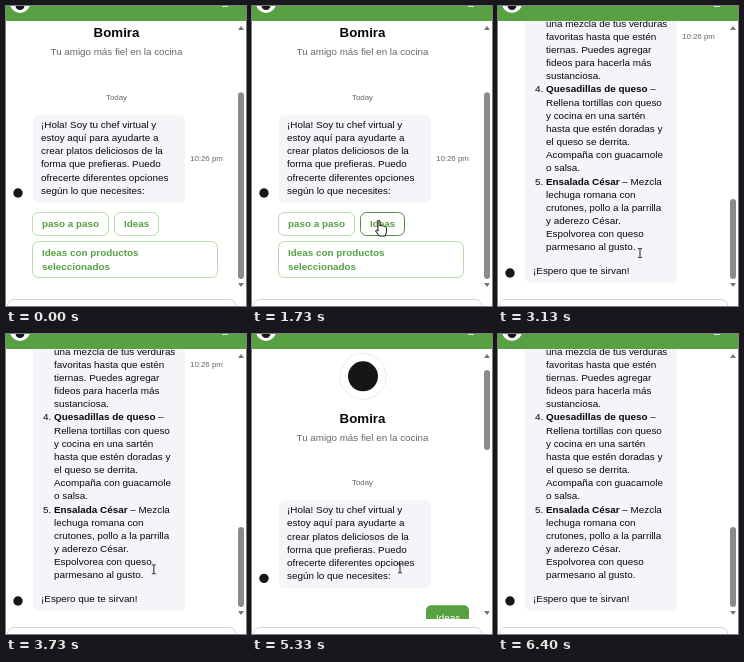
Recreate the animation shown at these times as an HTML page. Size 240 by 300 pixels, loop 6470 ms.

```html
<!DOCTYPE html>
<html lang="es">
<head>
<meta charset="utf-8">
<style>
  html, body { margin: 0; width: 100%; height: 100%; overflow: hidden; background: #fff; }
  svg { display: block; width: 100%; height: 100%; }
  text { font: 9.9px "Liberation Sans", Arial, sans-serif; fill: #080808; white-space: pre; }
  .bold { font-weight: bold; }
  .title { font-size: 13.3px; font-weight: bold; }
  .mid { text-anchor: middle; }
  .soft { fill: #666; font-size: 9.8px; }
  .small { fill: #666; font-size: 7.9px; }
  .link { fill: #55a043; font-weight: bold; }
  .button { fill: #fff; stroke: #b9d8ae; }
  .hover { stroke: #4f8f3f; }
  .bubble { fill: #f4f4f9; }
  .green { fill: #57a143; }
  .mark { fill: #161616; }
</style>
</head>
<body>
<svg viewBox="0 0 240 300">
  <clipPath id="view"><rect y="14" width="231" height="271"/></clipPath>
  <g clip-path="url(#view)"><g id="page">
    <circle cx="111" cy="69" r="23" fill="#fff" stroke="#dcdcea" stroke-dasharray="1.5 1"/>
    <circle class="mark" cx="111" cy="69" r="15"/>
    <g id="intro"></g>
    <g id="choices"></g>
    <g id="request">
      <rect class="green" x="174" y="298" width="43" height="25" rx="5"/>
      <text x="184" y="313.2" style="fill:#fff">Ideas</text>
    </g>
    <g id="answer"></g>
  </g></g>

  <rect class="green" width="240" height="15"/>
  <circle cx="14" cy="-3" r="10" fill="#fff"/>
  <circle class="mark" cx="14" cy="-.5" r="4.5"/>
  <path d="M216 0h6" stroke="#fff" stroke-width="1.5"/>

  <path d="M232 24l3-4 3 4zM232 277l3 4 3-4z" fill="#777"/>
  <rect id="thumb" x="232" width="6" rx="3" fill="#8b8b8b"/>
  <rect x="1.5" y="293.5" width="228" height="40" rx="6" fill="#fff" stroke="#cfd9cb"/>

  <g id="cursor">
    <path id="arrow" d="M0 0v10.2l2.4-2.2 1.9 4.2 1.8-.8-1.9-4h3.3z" fill="#111" stroke="#fff" stroke-width=".6"/>
    <path id="beam" d="M-2-4.5h1.3l.7.6.7-.6H2M0-4v8M-2 4.5h1.3L0 3.9l.7.6H2" fill="none" stroke="#222"/>
    <path id="hand" d="M-1 0q1-1.2 2 0v5l1-.6 1.3.8 1-.4 1.2.9 1-.1 1 1v4l-1.2 4.4h-6l-3.8-5.2q.4-1.7 2.5.3z" fill="#fff" stroke="#111"/>
  </g>
</svg>
<script>
const LOOP = 6470, VIEW = 270, STEP = 13.16;
const CLICK = 2070, REPLY = 2600, LEAVE = 6270;
const $ = id => document.getElementById(id);

const text = (x, y, s, cls = '') => `<text class="${cls}" x="${x}" y="${y}">${s}</text>`;
const lines = (x, y, rows, cls) => rows.map((s, i) => text(x, y + i * STEP, s, cls)).join('');
const box = (cls, x, y, w, h) => `<rect class="${cls}" x="${x}" y="${y}" width="${w}" height="${h}" rx="6"/>`;
const avatar = y => `<circle class="mark" cx="12" cy="${y}" r="4.7"/>`;

$('intro').innerHTML =
  text(110.5, 115.2, 'Bomira', 'title mid') +
  text(110.5, 133.4, 'Tu amigo más fiel en la cocina', 'soft mid') +
  text(110.5, 177.7, 'Today', 'small mid') +
  box('bubble', 27, 193, 152, 88) + avatar(271) +
  lines(35, 206, [
    '¡Hola! Soy tu chef virtual y', 'estoy aquí para ayudarte a',
    'crear platos deliciosos de la', 'forma que prefieras. Puedo',
    'ofrecerte diferentes opciones', 'según lo que necesites:']);

$('choices').innerHTML =
  text(184, 238.7, '10:26 pm', 'small') +
  box('button', 26.5, 290.5, 76, 23) + text(36, 305.4, 'paso a paso', 'link') +
  box('button" id="pick', 108.5, 290.5, 44, 23) + text(118, 305.4, 'Ideas', 'link') +
  box('button', 26.5, 319.5, 185, 36) +
  lines(36, 334.4, ['Ideas con productos', 'seleccionados'], 'link');

const dishes = [
  ['Tacos de pollo', ' – Cocina', 'pechugas de pollo en', 'trozos con especias,',
    'colócalas en tortillas y', 'agrega lechuga, tomate y', 'salsa al gusto.'],
  ['Pasta al pesto', ' – Hierve', 'pasta y mézclala con pesto', '(puedes comprarlo o',
    'hacerlo con albahaca, ajo y', 'aceite) y un poco de queso', 'rallado.'],
  ['Sopa de verduras', ' –', 'Cocina en agua o caldo', 'una mezcla de tus verduras',
    'favoritas hasta que estén', 'tiernas. Puedes agregar', 'fideos para hacerla más', 'sustanciosa.'],
  ['Quesadillas de queso', ' –', 'Rellena tortillas con queso', 'y cocina en una sartén',
    'hasta que estén doradas y', 'el queso se derrita.', 'Acompaña con guacamole', 'o salsa.'],
  ['Ensalada César', ' – Mezcla', 'lechuga romana con', 'crutones, pollo a la parrilla',
    'y aderezo César.', 'Espolvorea con queso', 'parmesano al gusto.']
];

let y = 393.4;
let answer = box('bubble', 27, 343, 152, 491) + avatar(824) +
  `<g id="stamp">${text(184, 590.3, '10:26 pm', 'small')}</g>` +
  lines(35, 357, ['¡Claro! Aquí tienes cinco', 'ideas de platos:']) +
  text(35, 825, '¡Espero que te sirvan!');
dishes.forEach(([name, rest, ...more], i) => {
  const first = `<tspan class="bold">${name}</tspan>${rest}`;
  answer += text(37, y, `${i + 1}.`) + lines(48, y, [first, ...more]);
  y += STEP * (more.length + 1);
});
$('answer').innerHTML = answer;

// Keys: time, then values
const scrollKeys = [[REPLY, 557], [3740, 557], [4330, 360], [5330, 27], [5410, 0], [5530, 0], [6070, 557]];
const cursorKeys = [[330, 200, 8], [730, 136, 66], [930, 136, 66], [1530, 127, 215], [2330, 127, 215],
  [2870, 142, 247], [3400, 142, 247], [3740, 148, 235], [6000, 148, 234], [LEAVE, 236, 296]];

function at(keys, t) {
  const next = keys.findIndex(k => k[0] > t);
  if (next < 0) return keys.at(-1).slice(1);
  if (!next) return keys[0].slice(1);
  const a = keys[next - 1], b = keys[next], p = (t - a[0]) / (b[0] - a[0]);
  return a.slice(1).map((v, i) => v + (b[i + 1] - v) * p);
}

const show = (id, on) => $(id).style.display = on ? '' : 'none';

function draw(now) {
  const t = now % LOOP, replied = t >= REPLY, waiting = t < CLICK;
  const scroll = replied ? at(scrollKeys, t)[0] : 84;
  const total = replied ? 827 : 354;
  $('page').setAttribute('transform', `translate(0 ${-scroll})`);
  $('thumb').setAttribute('y', 28 + scroll / total * 245);
  $('thumb').setAttribute('height', VIEW / total * 245);
  show('choices', waiting);
  show('request', !waiting);
  show('answer', replied);
  show('stamp', t < LEAVE);

  const [cx, cy] = at(cursorKeys, t), py = cy + scroll;
  const inside = cx > 27 && cx < 179 && cy < 286;
  const overText = inside && (py > 193 && py < 281 || replied && py > 343 && py < 834);
  const overPick = waiting && cx > 108 && cx < 153 && py > 290 && py < 314;
  $('pick').classList.toggle('hover', overPick);
  $('cursor').setAttribute('transform', `translate(${cx} ${cy})`);
  show('cursor', t >= 330 && t < LEAVE);
  show('beam', overText);
  show('hand', overPick);
  show('arrow', !overText && !overPick);
}

const start = performance.now();
(function tick() {
  draw(performance.now() - start);
  requestAnimationFrame(tick);
})();
</script>
</body>
</html>
```
